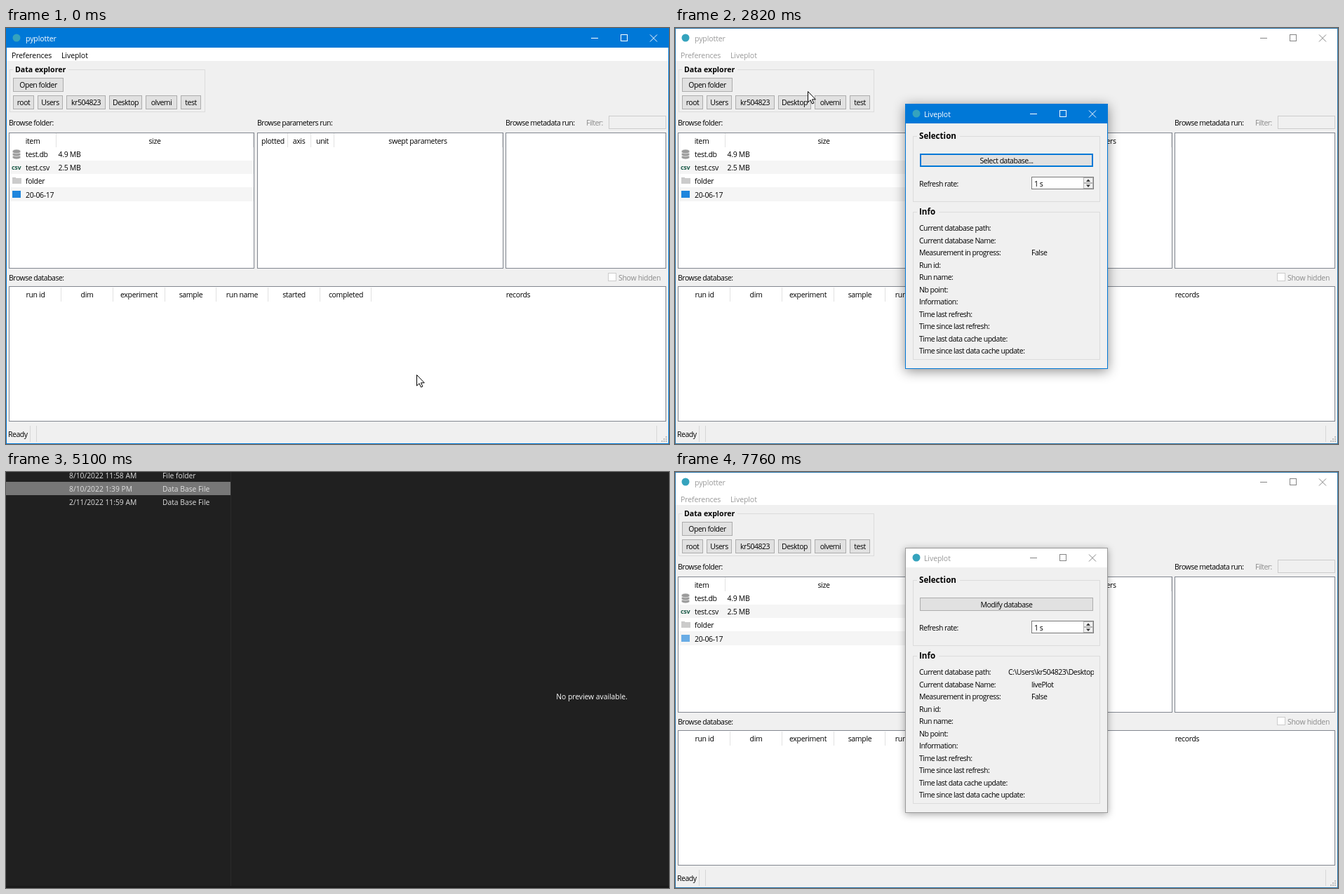
Animation, 945 px wide and 593 px high, one loop 8000 ms. Source, as an HTML page with a canvas:

```html
<!DOCTYPE html>
<html lang="en">
<head>
<meta charset="utf-8">
<title>pyplotter</title>
<style>
html, body { margin: 0; width: 100%; height: 100%; overflow: hidden; background: #f0f0f0; }
canvas { display: block; width: 945px; height: 593px; }
</style>
</head>
<body>
<canvas id="stage" width="945" height="593"></canvas>
<script>
const W = 945, H = 593, LOOP = 8000;
const ctx = document.getElementById('stage').getContext('2d');
const BLUE = '#0078d7', GREY = '#999';
const USER = 'kr504823', HOME = 'olvemi';

// Text styles: [font, letter spacing]
const family = '"Open Sans", "Noto Sans", sans-serif';
const STYLE = {
  label: [`10.5px ${family}`, '-0.5px'],
  table: [`10.5px ${family}`, '-0.32px'],
  menu: [`10.5px ${family}`, '-0.08px'],
  dark: [`10.3px ${family}`, '0px'],
  group: [`bold 10.6px ${family}`, '0px'],
  groupBig: [`bold 11.6px ${family}`, '0px'],
  icon: [`bold 9px ${family}`, '-0.3px']
};

function fill(x, y, w, h, color) {
  ctx.fillStyle = color;
  ctx.fillRect(x, y, w, h);
}

function box(x1, y1, x2, y2, border, inner) {
  if (inner) fill(x1, y1, x2 - x1, y2 - y1, inner);
  ctx.strokeStyle = border;
  ctx.lineWidth = 1;
  ctx.strokeRect(x1 + 0.5, y1 + 0.5, x2 - x1 - 1, y2 - y1 - 1);
}

// y is the middle of the capitals
function text(str, x, y, style = 'label', color = '#000', align = 'left') {
  [ctx.font, ctx.letterSpacing] = STYLE[style];
  ctx.textAlign = align;
  ctx.fillStyle = color;
  ctx.fillText(str, x, y + 4);
}

function path(points, close) {
  ctx.beginPath();
  points.forEach(([x, y], i) => i ? ctx.lineTo(x, y) : ctx.moveTo(x, y));
  if (close) ctx.closePath();
}

function disc(x, y, r, color) {
  ctx.fillStyle = color;
  ctx.beginPath();
  ctx.arc(x, y, r, 0, 7);
  ctx.fill();
}

function button(str, x1, y1, x2, y2, border = '#adadad', inner = '#e1e1e1') {
  box(x1, y1, x2, y2, border, inner);
  text(str, (x1 + x2) / 2, (y1 + y2) / 2, 'label', '#000', 'center');
}

function group(title, x1, y1, x2, y2, titleX, titleW, style) {
  box(x1, y1, x2, y2, '#dcdcdc');
  fill(titleX - 3, y1 - 2, titleW + 6, 5, '#f0f0f0');
  text(title, titleX, y1, style);
}

function titleBar(x, y, w, h, title, textX, iconX, minX, active) {
  const mid = y + h / 2;
  fill(x, y, w, h, active ? BLUE : '#fff');
  disc(iconX, mid, 5.5, '#35a3bd');
  text(title, textX, mid + 0.5, 'menu', active ? '#fff' : GREY);
  const cy = Math.round(mid) + 0.5;
  ctx.strokeStyle = active ? '#fff' : '#858585';
  ctx.lineWidth = 1;
  path([[minX, cy], [minX + 10, cy]]);
  ctx.stroke();
  ctx.strokeRect(minX + 42.5, cy - 5, 9, 9);
  path([[minX + 84, cy - 5], [minX + 94, cy + 5]]);
  ctx.stroke();
  path([[minX + 94, cy - 5], [minX + 84, cy + 5]]);
  ctx.stroke();
}

function headers(names, centers, y) {
  names.forEach((n, i) => text(n, centers[i], y, 'table', '#000', 'center'));
}

function separators(xs, y, h) {
  xs.forEach(x => fill(x, y, 1, h, '#e2e2e2'));
}

function fileIcons(markAlpha) {
  [183, 179, 175].forEach(y => {
    ctx.fillStyle = '#9b9b9b';
    ctx.beginPath();
    ctx.ellipse(15, y + 1, 6, 3, 0, 0, 7);
    ctx.fill();
    ctx.strokeStyle = '#f0f0f0';
    ctx.lineWidth = 0.8;
    ctx.stroke();
  });
  text('csv', 8, 198, 'icon', '#1d5c4a');
  fill(9, 213, 5, 3, '#c6c6c6');
  fill(9, 214, 13, 8, '#cbcbcb');
  ctx.globalAlpha = markAlpha;
  fill(9, 232, 12, 10, '#1f86dd');
  ctx.globalAlpha = 1;
}

function mainWindow(t, active) {
  fill(0, 0, W, H, '#f0f0f0');
  titleBar(0, 0, W, 28, 'pyplotter', 28, 15, 834, active);
  fill(0, 28, W, 19, '#fff');
  const hover = t >= 1100 && t < 2050;
  if (hover) box(72, 29, 125, 47, '#99d1ff', '#cce8ff');
  const menuColor = active ? '#000' : GREY;
  text('Preferences', 8, 38.5, 'menu', menuColor);
  text('Liveplot', 79, 38.5, 'menu', menuColor);

  group('Data explorer', 5, 59, 284, 120, 13, 73, 'group');
  button('Open folder', 10, 71, 82, 91);
  [['root', 10, 40], ['Users', 45, 81], [USER, 86, 142], ['Desktop', 147, 194],
   [HOME, 199, 244], ['test', 249, 278]].forEach(([n, a, b]) => button(n, a, 96, b, 116));

  text('Browse folder:', 4, 135);
  text('Browse parameters run:', 358, 135);
  text('Browse metadata run:', 712, 135);
  text('Filter:', 827, 135, 'label', '#8b8b8b');
  box(859, 125, 941, 144, '#cccccc', '#f0f0f0');

  const edge = '#828790';
  box(4, 149, 354, 343, edge, '#fff');
  box(358, 149, 709, 343, edge, '#fff');
  box(712, 149, 941, 343, edge, '#fff');
  box(4, 368, 941, 561, edge, '#fff');

  fill(5, 189, 348, 19, '#f5f5f5');
  fill(5, 227, 348, 20, '#f5f5f5');
  separators([71, 352], 150, 20);
  headers(['item', 'size'], [38, 212], 160.5);
  [['test.db', '4.9 MB'], ['test.csv', '2.5 MB'], ['folder', ''], ['20-06-17', '']].forEach(([n, size], i) => {
    const y = 180 + i * 19.2;
    text(n, 28, y, 'table');
    text(size, 74.5, y, 'table');
  });
  fileIcons(t >= 5210 ? 0.65 : 1);

  separators([401, 434, 467, 707], 150, 20);
  headers(['plotted', 'axis', 'unit', 'swept parameters'], [380.5, 417.5, 451, 587], 160.5);

  text('Browse database:', 4, 355.5);
  box(858, 349, 870, 361, '#cccccc', '#fff');
  text('Show hidden', 873, 355.5, 'table', '#8b8b8b');
  separators([78, 152, 226, 299, 373, 447, 520], 370, 20);
  headers(['run id', 'dim', 'experiment', 'sample', 'run name', 'started', 'completed', 'records'],
    [42, 115.5, 189.5, 263.5, 336.5, 410.5, 484.5, 730], 379.5);

  text('Ready', 3, 579);
  [34, 43, 927].forEach(x => fill(x, 567, 1, 23, '#d7d7d7'));
  for (let i = 0; i < 3; i++)
    for (let j = 0; j <= i; j++) fill(940 - j * 3, 582 + i * 3, 2, 2, '#bfbfbf');
  box(0, 0, W, H, active ? BLUE : '#2a76ab');
}

function popup(t, pos) {
  if (t < 1390 || t >= 2050) return;
  ctx.save();
  ctx.globalAlpha = Math.min(1, (Math.floor((t - 1390) / 40) + 1) / 5);
  ctx.shadowColor = 'rgba(0,0,0,.45)';
  ctx.shadowBlur = 4;
  ctx.shadowOffsetX = ctx.shadowOffsetY = 3;
  fill(72, 48, 121, 25, '#f2f2f2');
  ctx.shadowColor = 'transparent';
  box(72, 48, 193, 73, '#cccccc');
  if (pos[1] > 50) fill(75, 51, 115, 19, '#91c9f7');
  text('Open liveplot', 105, 61, 'menu');
  ctx.restore();
}

function databaseButton(t, modified) {
  const state = (border, inner) => button(modified ? 'Modify database' : 'Select database...', 349, 179, 596, 198, border, inner);
  if (t >= 3510 && t < 3640) state('#005499', '#cce4f7');
  else if (t >= 3150 && t < 4000) state('#2b78b4', '#e5f1fb');
  else if (t < 3150 || (t >= 5380 && t < 7760)) {
    state(BLUE);
    box(350, 180, 595, 197, BLUE);
  } else state();
}

function spinBox() {
  box(508, 212, 597, 230, '#7a7a7a', '#fff');
  text('1 s', 512, 222);
  box(582, 213, 596, 221, '#b5b5b5', '#f0f0f0');
  box(582, 221, 596, 229, '#b5b5b5', '#f0f0f0');
  ctx.fillStyle = '#333';
  path([[586, 219], [592, 219], [589, 215.5]], true);
  ctx.fill();
  path([[586, 223.5], [592, 223.5], [589, 227]], true);
  ctx.fill();
}

const INFO = ['Current database path:', 'Current database Name:', 'Measurement in progress:', 'Run id:',
  'Run name:', 'Nb point:', 'Information:', 'Time last refresh:', 'Time since last refresh:',
  'Time last data cache update:', 'Time since last data cache update:'];

function liveplot(t) {
  if (t < 2100) return;
  const active = t < 3700 || (t >= 5380 && t < 7710);
  const modified = t >= 5380;
  const open = Math.min(1, (Math.floor((t - 2100) / 40) + 1) / 6);
  ctx.save();
  ctx.globalAlpha = open;
  const s = 0.9 + 0.1 * open;
  ctx.translate(472.5, 297);
  ctx.scale(s, s);
  ctx.translate(-472.5, -297);

  ctx.save();
  ctx.shadowColor = active ? 'rgba(0,0,0,.45)' : 'rgba(0,0,0,.35)';
  ctx.shadowBlur = active ? 16 : 10;
  ctx.shadowOffsetY = active ? 3 : 2;
  fill(328, 108, 289, 378, '#f0f0f0');
  ctx.restore();

  titleBar(328, 108, 289, 28, 'Liveplot', 355, 344, 506, active);
  box(328, 108, 617, 486, active ? BLUE : '#9a9a9a');

  group('Selection', 339, 154, 606, 248, 348, 55, 'groupBig');
  databaseButton(t, modified);
  text('Refresh rate:', 348, 222);
  spinBox();

  group('Info', 339, 262, 606, 473, 348, 25, 'groupBig');
  INFO.forEach((label, i) => text(label, 348, 285 + i * 17.5));
  text('False', 508, 320);
  if (modified) {
    text('livePlot', 508, 302.5);
    ctx.beginPath();
    ctx.rect(470, 275, 127, 20);
    ctx.clip();
    text(`C:\\Users\\${USER}\\Desktop\\`, 475, 285);
  }
  ctx.restore();
}

function fileDialog(t, pos) {
  if (t < 3880 || t >= 5210) return;
  ctx.save();
  ctx.globalAlpha = t < 3930 ? 0.4 : t < 3990 ? 0.8 : 1;
  fill(0, 0, W, H, '#202020');
  fill(320, 0, 1, 590, '#2b2b2b');
  fill(0, 590, W, 3, '#1a1a1a');
  const rows = [['8/10/2022 11:58 AM', 'File folder'], ['8/10/2022 1:39 PM', 'Data Base File'],
    ['2/11/2022 11:59 AM', 'Data Base File']];
  rows.forEach(([date, type], i) => {
    const top = -5 + i * 19.3;
    const over = pos[0] < 320 && pos[1] >= top && pos[1] < top + 19.3;
    if (over) fill(0, Math.round(top), 320, 19, t >= 4850 ? '#777777' : '#4d4d4d');
    text(date, 90, 4.5 + i * 19.3, 'dark', '#dedede');
    text(type, 223, 4.5 + i * 19.3, 'dark', '#dedede');
  });
  text(t >= 5100 ? 'No preview available.' : 'Select a file to preview.', 835, 319.5, 'dark', '#fff', 'center');
  ctx.restore();
}

// Pointer moves: start, step length, number of steps, from, to, eased
const MOVES = [
  [290, 39, 21, [585, 494], [99, 47], true],
  [1100, 40, 3, [99, 47], [99, 46], false],
  [1860, 50, 4, [99, 46], [108, 53], true],
  [2600, 39.4, 17, [108, 53], [391, 184], true],
  [4160, 51, 9, [391, 184], [-14, 22], true],
  [6380, 41, 11, [-114, 168], [1032, 409], false]
];

function pointer(t) {
  let pos = MOVES[0][3];
  for (const [start, step, count, a, b, eased] of MOVES) {
    // hold the previous pose through the 50 ms before the menu item is reached
    if (t < start) break;
    const p = Math.min(1, (Math.floor((t - start) / step) + 1) / count);
    const e = eased ? p * p * (3 - 2 * p) : p;
    pos = a.map((v, i) => v + (b[i] - v) * e);
  }
  if (t >= 1860 && t < 1910) return [99, 46];
  return pos;
}

function drawPointer([x, y]) {
  ctx.save();
  ctx.translate(Math.round(x) + 0.5, Math.round(y) + 0.5);
  path([[0, 0], [0, 15.5], [3.6, 12.2], [6, 17.5], [8.4, 16.5], [6, 11.3], [10.8, 11.3]], true);
  ctx.fillStyle = '#fff';
  ctx.fill();
  ctx.strokeStyle = '#000';
  ctx.lineWidth = 1;
  ctx.stroke();
  ctx.restore();
}

function draw(t) {
  const pos = pointer(t);
  mainWindow(t, t < 2100);
  popup(t, pos);
  liveplot(t);
  if (t >= 3600 && t < 3880) disc(391, 184, 11, 'rgba(120,190,255,.18)');
  fileDialog(t, pos);
  drawPointer(pos);
}

function frame() {
  draw(performance.now() % LOOP);
  requestAnimationFrame(frame);
}
frame();
</script>
</body>
</html>
```
